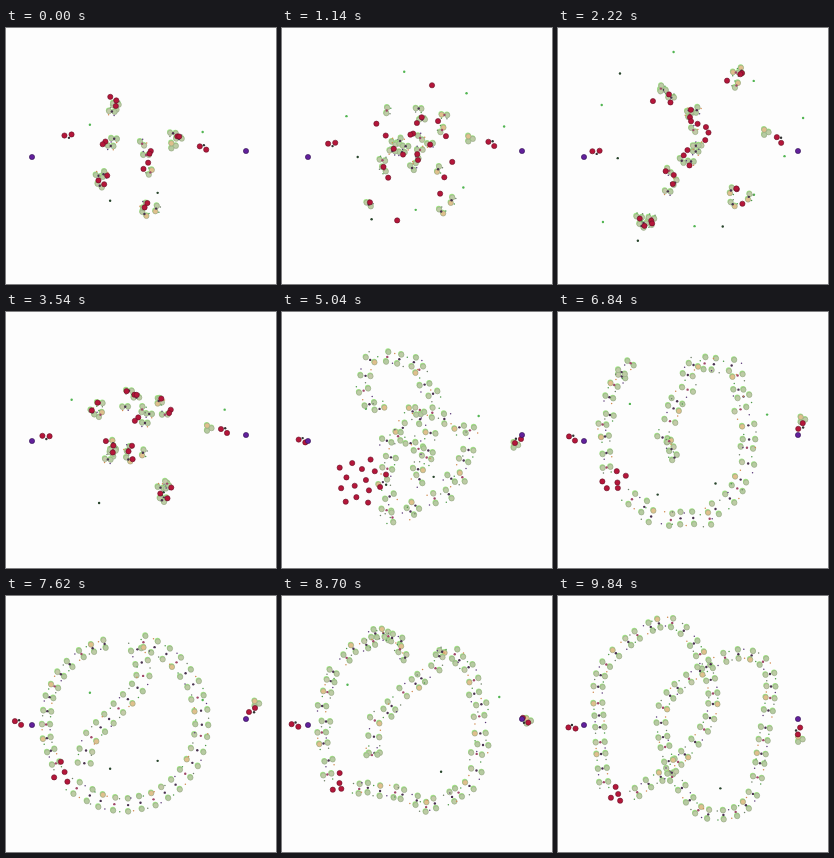
Recreate the animation shown at these times as an HTML page with a canvas. Size 270 px wide and 256 px high, loop 9.9 s.

```html
<!DOCTYPE html>
<html>
<head>
<meta charset="utf-8">
<title>Self-assembling chain</title>
<style>
html, body { margin: 0; width: 100%; height: 100%; overflow: hidden; background: #fdfdfd; }
canvas { display: block; }
</style>
</head>
<body>
<canvas id="stage" width="270" height="256"></canvas>
<script>
const ctx = document.getElementById('stage').getContext('2d');
const LOOP = 9900, STEP = 60, SPACING = 13.5, SLOTS = 48, TAU = Math.PI * 2;
const ANCHORS = [[26, 129], [240, 123]];

const random = n => { const x = Math.sin(n * 127.1 + 3.7) * 43758.5453; return x - Math.floor(x); };
const mix = (a, b, u) => a + (b - a) * u;
const polar = (x, y, r, a) => [x + r * Math.cos(a), y + r * Math.sin(a)];
const range = (n, make) => Array.from({ length: n }, (_, i) => make(i));

function arc(cx, cy, rx, ry, from, to) {
  return range(9, i => {
    const a = mix(from, to, i / 8) * Math.PI / 180;
    return [cx + rx * Math.cos(a), cy + ry * Math.sin(a)];
  });
}

// Early poses gather fragments around hubs; later ones lay two arms along curves.
const poses = [
  { time: 0, size: 8, beads: [6, 10], reds: 16, dust: 4, reach: 70, mates: [[62, 107], [197, 120]],
    hubs: [[106, 76], [97, 152], [143, 180], [141, 120], [167, 111], [104, 114], [144, 139]] },
  { time: 2220, size: 11, beads: [9, 17], reds: 26, dust: 13, reach: 125, mates: [[38, 123], [221, 112]],
    hubs: [[88, 190], [138, 90], [181, 168], [142, 108], [105, 70], [132, 128], [178, 50], [110, 153]] },
  { time: 3540, size: 10, beads: [9, 16], reds: 19, dust: 4, reach: 95, mates: [[40, 124], [218, 119]],
    hubs: [[102, 138], [160, 181], [128, 140], [160, 94], [123, 86], [138, 106], [94, 96]] },
  { time: 5040, spread: [5, 5], jitter: 9, reds: 15, heap: [79, 168, 27], dust: 4, reach: 70,
    mates: [[20, 129], [236, 129]],
    left: [[108, 200], [105, 140], [125, 115], [140, 165], [150, 120]],
    right: [[112, 206], [160, 182], [188, 140], [170, 106], [130, 106], [148, 85], [130, 50],
      [100, 44], [84, 65], [95, 100]] },
  { time: 6060, spread: [4, 6], jitter: 3, reds: 8, heap: [57, 163, 13], dust: 4, reach: 100,
    mates: [[16, 126], [239, 114]],
    left: [[52, 140], [53, 100], [72, 40]],
    right: [[75, 185], [115, 207], [165, 196], [187, 140], [178, 85], [190, 58], [150, 52],
      [112, 80], [115, 126], [158, 115]] },
  { time: 7620, spread: [4, 6.5], jitter: 1, reds: 4, heap: [54, 176, 13], dust: 4, reach: 70,
    mates: [[12, 127], [246, 114]],
    left: arc(118, 127, 78, 82, 150, 262),
    right: [...arc(118, 127, 78, 82, 128, -80), [137, 82], [107, 119], [83, 145], [78, 172]] },
  { time: 9840, spread: [4.5, 4.5], jitter: 0, reds: 4, heap: [57, 198, 9], dust: 1, reach: 115,
    mates: [[14, 132], [241, 135]],
    left: [[46, 188], [42, 135], [46, 72], [108, 26], [147, 68], [152, 122], [108, 180]],
    right: [[78, 197], [112, 180], [145, 217], [190, 207], [206, 140], [212, 78], [185, 58],
      [142, 75], [104, 115], [115, 182]] }
];

function spline(points) {
  const at = i => points[Math.max(0, Math.min(points.length - 1, i))];
  return range((points.length - 1) * 16 + 1, n => {
    const i = Math.floor(n / 16), u = n / 16 - i;
    return [0, 1].map(k => {
      const [a, b, c, d] = [at(i - 1)[k], at(i)[k], at(i + 1)[k], at(i + 2)[k]];
      return b + u / 2 * (c - a + u * (2 * a - 5 * b + 4 * c - d + u * (3 * (b - c) + d - a)));
    });
  });
}

const makeBead = (x, y, angle, spread) =>
  ({ x, y, dx: Math.cos(angle) * spread, dy: Math.sin(angle) * spread });

function nearHub(pose, i, seed) {
  const [x, y] = pose.hubs[i % pose.hubs.length];
  return polar(x, y, pose.size * (0.5 + 0.5 * random(i + seed)), random(i * 3 + seed) * TAU);
}

function placeArm(pose, side) {
  if (pose.hubs) {
    const items = range(SLOTS, i => {
      const [x, y] = nearHub(pose, i, side * 50);
      return makeBead(x, y, random(i + side) * TAU, 2.8);
    });
    return { items, count: pose.beads[side] };
  }
  const curve = spline(side ? pose.right : pose.left), items = [];
  let walked = 0;
  for (let i = 1; i < curve.length; i++) {
    const [x0, y0] = curve[i - 1], [x1, y1] = curve[i];
    walked += Math.hypot(x1 - x0, y1 - y0);
    if (walked < items.length * SPACING) continue;
    const shake = k => (random(items.length * 3 + k) - 0.5) * pose.jitter;
    const normal = Math.atan2(y1 - y0, x1 - x0) + Math.PI / 2;
    items.push(makeBead(x1 + shake(0), y1 + shake(1), normal + shake(2) * 0.1, pose.spread[side]));
  }
  const count = items.length;
  while (items.length < SLOTS) items.push(items[count - 1]);
  return { items, count };
}

function placeReds(pose) {
  const items = range(SLOTS, i => {
    const [x, y] = pose.hubs
      ? nearHub(pose, i, 200)
      : polar(pose.heap[0], pose.heap[1], pose.heap[2] * Math.sqrt((i + 0.5) / pose.reds), i * 2.4);
    return { x, y };
  });
  return { items, count: pose.reds };
}

function placeDust(pose) {
  const items = range(SLOTS, i => {
    const [x, y] = polar(135, 122, pose.reach * (0.6 + 0.4 * random(i)), i * 2.4 + 1.2);
    return { x, y };
  });
  return { items, count: pose.dust };
}

for (const pose of poses) {
  pose.groups = [placeDust(pose), placeArm(pose, 0), placeArm(pose, 1), placeReds(pose)];
}

function disc(x, y, r, fill, line) {
  ctx.beginPath();
  ctx.arc(x, y, r, 0, TAU);
  ctx.fillStyle = fill;
  ctx.fill();
  if (line) {
    ctx.strokeStyle = line;
    ctx.lineWidth = 0.6;
    ctx.stroke();
  }
}

const atomColours = ['#bccca4', '#b5cba0', '#dfc08c', '#c3cba8'];
const tinyColours = ['#5a3a78', '#4f9a4a', '#d08a50', '#70806a'];

function drawAtom(x, y, fill) {
  disc(x - 0.4, y - 0.9, 2.8, '#a2e886');
  disc(x, y, 2.6, fill, '#95a585');
}

function drawRed(x, y) {
  disc(x, y, 2.6, '#b5163a', '#651428');
}

function drawSpeck({ x, y }, i) {
  disc(x, y, 1.2, i % 3 ? '#52b552' : '#28452c');
}

function drawBead({ x, y, dx, dy }, i) {
  drawAtom(x - dx, y - dy, atomColours[i % 4]);
  drawAtom(x + dx, y + dy, atomColours[i % 2]);
  disc(x, y, 1.2, i % 3 ? '#4a3350' : '#a04868');
  for (const s of [-1, 1]) {
    disc(x + dx * s - dy * 1.3, y + dy * s + dx * 1.3, 0.75, tinyColours[(i + s + 4) % 4]);
  }
}

const painters = [drawSpeck, drawBead, drawBead, p => drawRed(p.x, p.y)];

function blend(a, b, u, seed, t) {
  const drift = Math.sin(Math.PI * u) * 2.5, out = {};
  for (const key in a) out[key] = mix(a[key], b[key], u);
  out.x += drift * Math.sin(t / 260 + seed * 2.4);
  out.y += drift * Math.cos(t / 310 + seed * 1.7);
  return out;
}

// A fixed purple atom with two red mates; the right one also carries a green tip.
function drawSatellite(side, from, to, u) {
  const [ax, ay] = ANCHORS[side];
  const [mx, my] = [0, 1].map(k => mix(from.mates[side][k], to.mates[side][k], u));
  const angle = Math.atan2(my - ay, mx - ax);
  if (side) {
    const tx = mix(ax, mx, 1.7), ty = mix(ay, my, 1.7);
    for (let i = 0; i < 3; i++) drawAtom(...polar(tx, ty, 3, i * TAU / 3), atomColours[i]);
  }
  for (const s of [-1, 1]) drawRed(...polar(mx, my, 3.6 * s, angle + 0.4));
  disc(...polar(mx, my, 3, angle + 1.8), 1.2, '#333');
  disc(ax, ay, 2.6, '#62209c', '#301050');
}

function draw(now) {
  const t = Math.floor(now % LOOP / STEP) * STEP;
  let k = 0;
  while (k < poses.length - 2 && t >= poses[k + 1].time) k++;
  const from = poses[k], to = poses[k + 1];
  const u = (t - from.time) / (to.time - from.time);

  ctx.fillStyle = '#fdfdfd';
  ctx.fillRect(0, 0, 270, 256);
  from.groups.forEach((group, g) => {
    const next = to.groups[g], shown = Math.round(mix(group.count, next.count, u));
    for (let i = 0; i < shown; i++) {
      painters[g](blend(group.items[i], next.items[i], u, i + g * 9, t), i);
    }
  });
  for (const side of [0, 1]) drawSatellite(side, from, to, u);
}

const start = performance.now();
function tick() {
  draw(performance.now() - start);
  requestAnimationFrame(tick);
}
tick();
</script>
</body>
</html>
```
